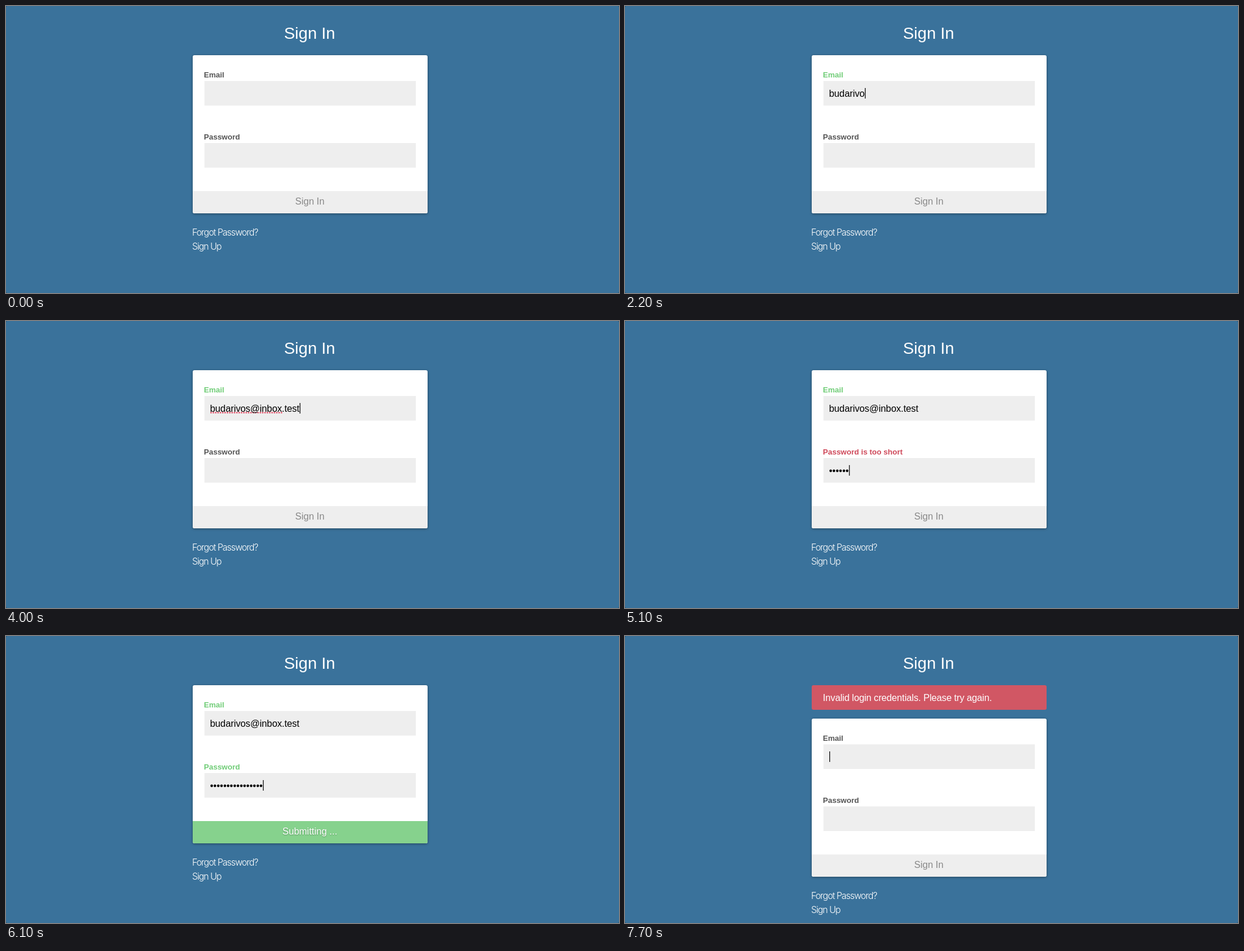
Write an HTML page that moves like this. It is 1044 by 490 pixels and loops after 8 s.

```html
<!DOCTYPE html>
<html lang="en">
<head>
<meta charset="utf-8">
<title>Sign In</title>
<style>
  html, body { margin: 0; width: 100%; height: 100%; overflow: hidden; background: #2a556f; }
  svg { display: block; font: 16px "Liberation Sans", Arial, sans-serif; }
  text { white-space: pre; }
  .title { font-size: 28px; fill: #fff; }
  .card { filter: drop-shadow(0 1px 2px rgba(0, 0, 0, .4)); }
  .label { font-size: 13px; font-weight: bold; }
  .email { letter-spacing: -.1px; }
  .alert { fill: #fff; letter-spacing: -.15px; }
  .link { font: 300 15.5px Inter, "Liberation Sans", sans-serif; fill: #fff; letter-spacing: -1.05px; }
  .typo { stroke: #e2405c; stroke-width: 2; stroke-dasharray: 2.5 1.5; }
</style>
</head>
<body>
<svg width="1044" height="490" viewBox="0 0 1044 490">
  <rect width="1044" height="490" rx="3" fill="#3a729b"/>
  <text class="title" x="517" y="56" text-anchor="middle">Sign In</text>
  <g id="alert">
    <rect x="318" y="84" width="400" height="42" rx="3" fill="#d15764"/>
    <text class="alert" x="337" y="111">Invalid login credentials. Please try again.</text>
  </g>
  <g id="form">
    <rect class="card" x="318" y="84" width="400" height="270" rx="3" fill="#fff"/>
    <text class="label" id="emailLabel" x="337" y="122">Email</text>
    <rect x="338" y="128" width="360" height="42" fill="#eee"/>
    <path class="typo" id="typo"/>
    <text class="email" id="email" x="347.5" y="155"></text>
    <text class="label" id="passLabel" x="337" y="228"></text>
    <rect x="338" y="234" width="360" height="42" fill="#eee"/>
    <text id="pass" x="347.5" y="261"></text>
    <rect id="caret" width="1.2" height="18"/>
    <path id="button" d="M318 316h400v35a3 3 0 0 1-3 3h-394a3 3 0 0 1-3-3z"/>
    <text id="buttonText" x="517.5" y="339" text-anchor="middle"></text>
    <text class="link" x="317" y="392">Forgot Password?</text>
    <text class="link" x="317" y="416">Sign Up</text>
  </g>
</svg>
<script>
const LOOP = 8000, BLINK = 470, FADE = 200;
const ADDRESS = "budarivos@inbox.test", MIN_PASS = 8;
const WORD_END = ADDRESS.indexOf(".");
const GREY = "#555", GREEN = "#71cd78", RED = "#cf4a5b";

// Moments of the sign-in attempt, in ms
const emailTyping = { start: 1240, step: 123, count: ADDRESS.length };
const passTyping = { start: 4650, step: 85, count: 16 };
const focusEmail = 900, focusPass = 4500, submit = 6000, reject = 6112, refocus = 6755;
const ready = passTyping.start + (MIN_PASS - 1) * passTyping.step;

const el = {};
for (const node of document.querySelectorAll("[id]")) el[node.id] = node;

const typed = (t, { start, step, count }) =>
  Math.max(0, Math.min(count, Math.floor((t - start) / step) + 1));
const keyTimes = ({ start, step, count }) => Array.from({ length: count }, (_, i) => start + i * step);
const caretEvents = [focusEmail, ...keyTimes(emailTyping), focusPass, ...keyTimes(passTyping), refocus];

const show = (node, on) => node.setAttribute("visibility", on ? "visible" : "hidden");
const easeOut = (t, start) => {
  const p = Math.max(0, Math.min(1, (t - start) / FADE));
  return 1 - (1 - p) ** 2;
};
const mix = (a, b, k) => `rgb(${a.map((v, i) => v + (b[i] - v) * k)})`;

function drawCaret(t) {
  const last = caretEvents.filter(e => e <= t).pop();
  const inPass = t >= focusPass && t < refocus;
  const field = inPass ? el.pass : el.email;
  const width = field.textContent ? field.getComputedTextLength() : 0;
  el.caret.setAttribute("x", 348 + width);
  el.caret.setAttribute("y", inPass ? 246 : 140);
  show(el.caret, last !== undefined && Math.floor((t - last) / BLINK) % 2 === 0);
}

function drawButton(t) {
  const k = t < reject ? easeOut(t, ready) : 1 - easeOut(t, reject);
  el.button.setAttribute("fill", mix([238, 238, 238], [134, 210, 141], k));
  el.buttonText.setAttribute("fill", mix([136, 136, 136], [255, 255, 255], k));
  el.buttonText.style.textShadow = `0 1px 2px rgba(0, 0, 0, ${0.3 * k})`;
  el.buttonText.textContent = t >= submit && t < reject ? "Submitting ..." : "Sign In";
}

function draw(t) {
  const rejected = t >= reject;
  const letters = rejected ? 0 : typed(t, emailTyping);
  const dots = rejected ? 0 : typed(t, passTyping);
  const tooShort = dots > 0 && dots < MIN_PASS;

  show(el.alert, rejected);
  el.form.setAttribute("transform", `translate(0 ${rejected ? 57 : 0})`);

  el.email.textContent = ADDRESS.slice(0, letters);
  el.emailLabel.setAttribute("fill", letters ? GREEN : GREY);
  const misspelt = letters > WORD_END && t < focusPass;
  show(el.typo, misspelt);
  if (misspelt) el.typo.setAttribute("d", `M348 156.5h${el.email.getSubStringLength(0, WORD_END)}`);

  el.pass.textContent = "•".repeat(dots);
  el.passLabel.textContent = tooShort ? "Password is too short" : "Password";
  el.passLabel.setAttribute("fill", tooShort ? RED : dots ? GREEN : GREY);

  drawButton(t);
  drawCaret(t);
}

function tick() {
  draw(performance.now() % LOOP);
  requestAnimationFrame(tick);
}
tick();
</script>
</body>
</html>
```
